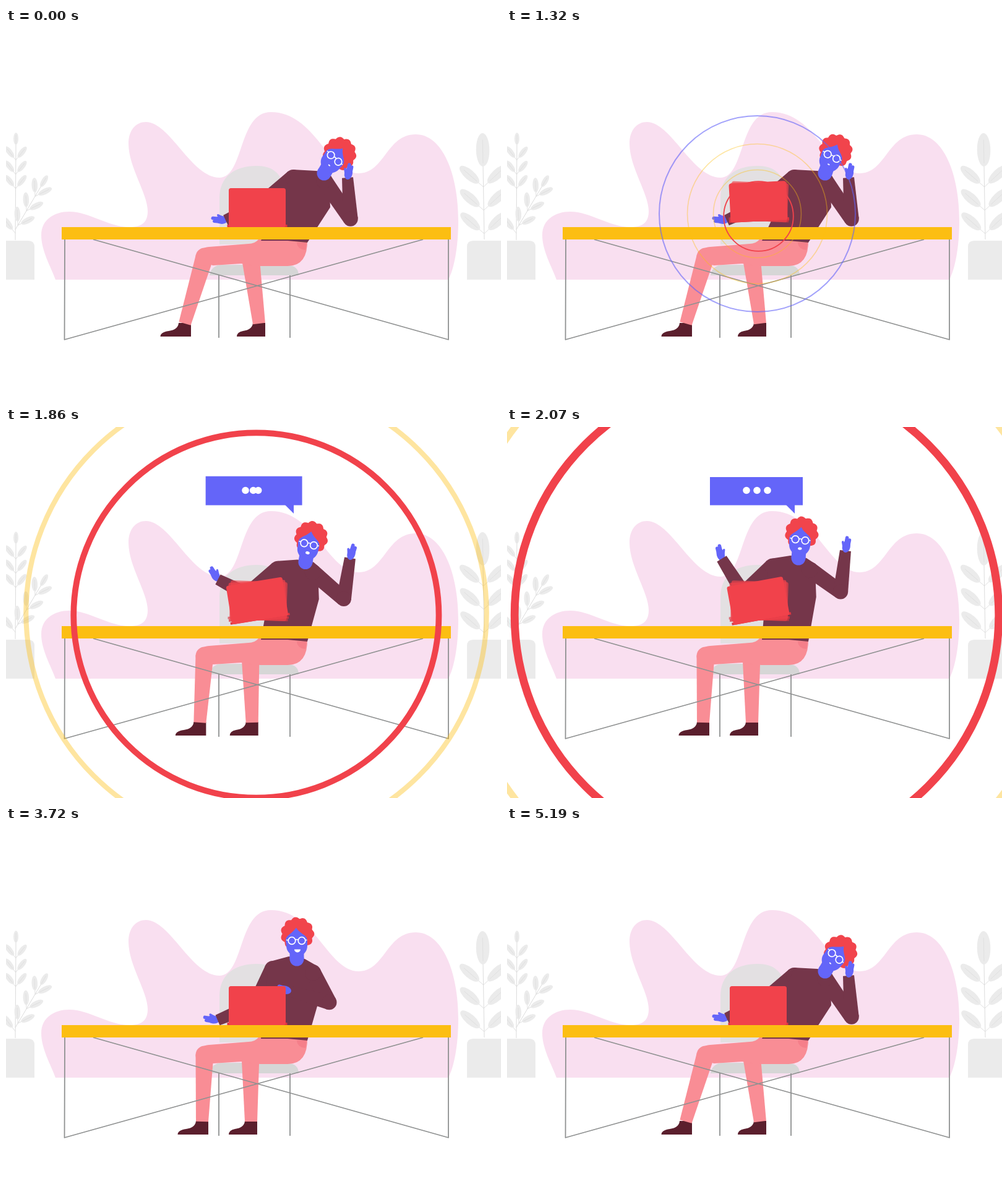
Write an HTML page with a canvas that moves like this. It is 800x600 px and loops after 5400 ms.

```html
<!DOCTYPE html>
<html lang="en">
<head>
<meta charset="utf-8">
<title>Incoming call</title>
<style>
  html, body { margin: 0; width: 100%; height: 100%; overflow: hidden; background: #fff; }
  canvas { display: block; width: 800px; height: 600px; }
</style>
</head>
<body>
<canvas id="stage" width="800" height="600"></canvas>
<script>
const ctx = document.getElementById('stage').getContext('2d');
const LOOP = 5400, STEP = 30, RAD = Math.PI / 180;
const C = {
  blob: '#f9dff0', plant: '#ebebeb', vein: '#dcdcdc', seat: '#d6d6d6', back: '#e3e0e2',
  line: '#8f9191', desk: '#fcbe12', skin: '#6465f9', hair: '#f1444c', knit: '#75364a',
  pants: '#f98d95', pocket: '#f57f8a', shoe: '#5b1f2d', red: '#f1424b', edge: '#dd3540'
};

// ---- motion: smooth monotone curve through [time, value] keys ----
function curve(keys, t) {
  const n = keys.length - 1;
  if (t <= keys[0][0]) return keys[0][1];
  if (t >= keys[n][0]) return keys[n][1];
  const rate = i => (keys[i + 1][1] - keys[i][1]) / (keys[i + 1][0] - keys[i][0]);
  const slope = i => {
    if (i === 0 || i === n) return 0;
    const a = rate(i - 1), b = rate(i);
    return a * b <= 0 ? 0 : 2 * a * b / (a + b);
  };
  let i = 0;
  while (t >= keys[i + 1][0]) i++;
  const h = keys[i + 1][0] - keys[i][0], u = (t - keys[i][0]) / h, v = 1 - u;
  return v * v * (1 + 2 * u) * keys[i][1] + u * u * (3 - 2 * u) * keys[i + 1][1]
       + h * u * v * (v * slope(i) - u * slope(i + 1));
}

// ---- drawing helpers ----
function fill(d, color) { ctx.fillStyle = color; ctx.fill(new Path2D(d)); }
function stroke(d, color, width) {
  ctx.strokeStyle = color; ctx.lineWidth = width; ctx.stroke(new Path2D(d));
}
function disc(x, y, r, color, ry = r) {
  ctx.fillStyle = color; ctx.beginPath(); ctx.ellipse(x, y, r, ry, 0, 0, 7); ctx.fill();
}
function ring(x, y, r, color, width) {
  ctx.strokeStyle = color; ctx.lineWidth = width;
  ctx.beginPath(); ctx.arc(x, y, r, 0, 7); ctx.stroke();
}
function poly(pts, color) {
  ctx.fillStyle = color; ctx.beginPath();
  pts.forEach(p => ctx.lineTo(p[0], p[1]));
  ctx.closePath(); ctx.fill();
}
function bone([x1, y1], w1, [x2, y2], w2, color) {
  const d = Math.hypot(x2 - x1, y2 - y1) || 1, nx = (y1 - y2) / d / 2, ny = (x2 - x1) / d / 2;
  poly([[x1 + nx * w1, y1 + ny * w1], [x2 + nx * w2, y2 + ny * w2],
        [x2 - nx * w2, y2 - ny * w2], [x1 - nx * w1, y1 - ny * w1]], color);
  disc(x1, y1, w1 / 2, color);
}
function at(x, y, deg, draw) {
  ctx.save(); ctx.translate(x, y); ctx.rotate(deg * RAD); draw(); ctx.restore();
}

// ---- scenery ----
const BLOB = 'M80 407C72 385 57 360 57 335C57 310 78 297 102 297C135 297 165 322 200 322' +
  'C222 322 229 312 229 296C229 268 198 225 198 187C198 165 210 152 226 152' +
  'C265 152 300 242 345 242C385 242 375 136 428 136C500 136 520 235 570 235' +
  'C612 235 615 172 662 172C705 172 731 235 731 312C731 355 724 390 715 407Z';

function leaf(x, y, deg, len, gap) {
  at(x, y, deg, () => {
    stroke(`M0 0H${len * (gap + .6)}`, C.vein, .8);
    disc(len * gap, 0, len, C.plant, len * .4);
    stroke(`M${len * (gap - .8)} 0H${len * (gap + .6)}`, C.vein, .7);
  });
}
// A stem with three pairs of leaves between lo and hi, and one leaf on its tip
function frond(x0, y0, x1, y1, lo, hi, len, spread) {
  const dir = Math.atan2(y1 - y0, x1 - x0) / RAD;
  stroke(`M${x0} ${y0}L${x1} ${y1}`, C.vein, 1);
  for (let i = 0; i < 3; i++) {
    const u = lo + (hi - lo) * i / 2, x = x0 + (x1 - x0) * u, y = y0 + (y1 - y0) * u;
    leaf(x, y, dir - spread, len, 1.5);
    leaf(x, y, dir + spread, len, 1.5);
  }
  leaf(x1, y1, dir, len * (spread > 40 ? 1.35 : .9), 1);
}
function scenery() {
  fill(BLOB, C.blob);
  frond(15, 343, 16, 189, .54, .84, 11, 38);
  frond(15, 326, 56, 257, .1, .78, 12, 33);
  leaf(15, 332, -128, 13, 1.6);
  fill('M0 344H36Q46 344 46 354V407H0Z', C.plant);
  frond(773, 342, 771, 224, .08, .72, 20, 48);
  fill('M745 407V354Q745 344 755 344H800V407Z', C.plant);
  fill('M345 350V275C345 240 370 223 405 223C430 223 447 235 447 260V350Z', C.back);
  stroke('M344 399V501M459 399V501', C.line, 1.8);
  fill('M329 400Q332 383 350 383H455Q473 385 473 400Z', C.seat);
}
function desk() {
  ctx.lineJoin = 'round';
  stroke('M95 342L94.5 504L674 342M141 342L715 504V342', C.line, 1.8);
  ctx.fillStyle = C.desk;
  ctx.fillRect(90, 322, 629, 20);
}

// ---- person: each pose is a neck, a head tilt and two wrists ----
const bored = { neck: [514, 235], tilt: 42, left: [355, 311], right: [552, 242] };
const alert = { ...bored, tilt: 27 };
const startled = { neck: [502, 228], tilt: 22, left: [338, 290], right: [565, 229] };
const armsUp = { neck: [471, 212], tilt: 7, left: [347, 213], right: [547, 200] };
const typing = { neck: [454.5, 221], tilt: 0, left: [440, 325], right: [440, 305] };
const done = { neck: [470, 215], tilt: 0, left: [342, 314], right: [458, 267] };
const ACTS = [[900, bored], [1170, alert], [1320, alert], [1650, startled], [2070, armsUp],
  [2280, armsUp], [2700, typing], [3450, typing], [3720, done], [4440, bored]];

const slump = tilt => Math.min(1, tilt / 25);
// Elbow of a two-bone arm, bent towards the pole direction
function elbow([sx, sy], [wx, wy], upper, lower, poleX) {
  const d = Math.hypot(wx - sx, wy - sy), dx = (wx - sx) / d, dy = (wy - sy) / d;
  const along = (upper * upper - lower * lower + d * d) / (2 * d);
  const out = Math.sqrt(Math.max(0, upper * upper - along * along));
  const side = -dy * poleX + dx > 0 ? out : -out;
  return [sx + dx * along - dy * side, sy + dy * along + dx * side];
}
function rig({ neck: [x, y], tilt, left, right }) {
  const k = slump(tilt);
  const ls = [x - 39 - 11 * k, y + 16 - 9 * k], rs = [x + 26 - 26 * k, y + 22 - 11 * k];
  return [[x, y], [tilt, 0], ls, elbow(ls, left, 64, 66, -.5), left,
          rs, elbow(rs, right, 55 + 21 * k, 67, 1), right];
}
const RIGS = ACTS.map(([time, pose]) => [time, rig(pose)]);
const jointsAt = t => RIGS[0][1].map((_, j) =>
  [0, 1].map(axis => curve(RIGS.map(([time, r]) => [time, r[j][axis]]), t)));

function legs(t) {
  const step = curve([[1350, 0], [1650, .42], [1980, 1], [3900, 1], [4470, 0]], t);
  for (const [knee, foot, toe] of [[321, 289 + 28 * step, 39.5], [395, 409 - 13 * step, 36]]) {
    at(foot, 478, 0, () =>
      fill(`M-10 -1H10V21H${-toe}Q${-toe} 14 -26 12Q-11 10 -10 -1Z`, C.shoe));
    bone([knee, 370], 29, [foot, 478], 20, C.pants);
  }
  fill('M408 342H487Q488 385 455 385H411L380 381L334 384L308 371Q312 355 328 354L392 349Q402 349 408 342Z', C.pants);
  fill('M470 347Q471 358 484 359L486 347Z', C.pocket);
}
function hand([x, y], deg, side, tap) {
  at(x, y, deg, () => {
    ctx.scale(1, side);
    disc(7, 0, 10, C.skin, 6.5);
    ctx.lineCap = 'round';
    stroke('M5 -4L13 -7', C.skin, 3.5);
    at(10, 0, tap, () => stroke('M0 -1.5L11 -1.5M0 3L8 3', C.skin, 5.5));
    ctx.lineCap = 'butt';
  });
}
function arm(shoulder, bend, wrist) {
  bone(shoulder, 26, bend, 24, C.knit);
  bone(bend, 24, wrist, 18, C.knit);
}
function head([nx, ny], tilt, t) {
  const lean = tilt * .84 * RAD;
  const x = nx + 29.5 * Math.sin(lean), y = ny - 29.5 * Math.cos(lean);
  const smile = curve([[2300, 0], [2600, 1], [3900, 1], [4300, 0]], t);
  const gasp = curve([[1320, 0], [1650, 1], [2300, .6], [2500, 0]], t);
  at(x, y, tilt, () => {
    const curls = [];
    for (let d = 0; d < 360; d += 3) {
      const r = 24.3 + 3 * Math.abs(Math.cos(5.5 * d * RAD));
      curls.push([1 + r * Math.cos(d * RAD), -11 + r * Math.sin(d * RAD)]);
    }
    poly(curls, C.hair);
  });
  bone([nx, ny], 23, [x - 12 * Math.sin(tilt * RAD), y + 12 * Math.cos(tilt * RAD)], 23, C.skin);
  at(x, y, tilt, () => {
    fill('M-18 0C-18 -9 -10 -9 -1 -21C6 -10 17 -10 17 0V8C17 18 10 25 1 25C-9 25 -17 18 -17 8Z', C.skin);
    ring(-8, 0, 5.8, '#fff', 1.7);
    ring(8, 0, 5.8, '#fff', 1.7);
    stroke('M-2.5 -1Q0 -3 2.5 -1M-14 -1H-17M14 -1H16.5', '#fff', 1.5);
    const w = 2 + 3 * smile + 1.5 * gasp, rest = (1 + 1.4 * gasp) * (1 - smile);
    ctx.fillStyle = '#fff';
    ctx.beginPath();
    ctx.ellipse(1, 14, w, rest, 0, Math.PI, 2 * Math.PI);
    ctx.ellipse(1, 14, w, rest + 5 * smile, 0, 0, Math.PI);
    ctx.fill();
  });
}
function person(t) {
  const [neck, [tilt], ls, le, lw, rs, re, rw] = jointsAt(t);
  const [nx, ny] = neck;
  const idle = t < 900 || t > 4500;
  const tap = idle ? 24 * Math.abs(Math.sin(Math.PI * Math.min(t, 5190) * 17 / 5190)) : 0;
  const leftDir = Math.atan2(lw[1] - le[1], lw[0] - le[0]);
  const rightDir = Math.atan2(rw[1] - re[1], rw[0] - re[0]);
  legs(t);
  hand(lw, leftDir / RAD - 34 * Math.cos(leftDir), -1, -tap);
  arm(ls, le, lw);
  poly([[412, 344], [ls[0] - 8, ls[1] + 8], [ls[0], ls[1] - 13], [nx - 13, ny - 4], [nx + 13, ny],
        [rs[0] + 8, rs[1] - 10], [rs[0] + 10, rs[1] + 44], [487, 347], [455, 344]], C.knit);
  arm(rs, re, rw);
  head(neck, tilt, t);
  hand(rw, rightDir / RAD + 16 * slump(tilt), 1, 0);
}

// ---- ringing ----
function rings(t) {
  const s = curve([[1020, 0], [1140, .34], [1320, 1], [1650, 3.57], [2070, 6.95], [2430, 10]], t);
  if (s <= 0 || s >= 10) return;
  const yellow = 'rgba(252,190,18,.4)';
  ring(404.5, 300.5, 158.5 * s, 'rgba(100,101,249,.6)', 2 * s);
  ring(404.5, 300.5, 113 * s, yellow, 1.55 * s);
  ring(404.5, 300.5, 71 * s, yellow, 1.55 * s);
  ring(407 - .5 * s, 304.5, 56.3 * s, C.red, 1.85 * s);
}
function laptop(t) {
  const amp = curve([[1020, 0], [1200, 1], [2300, 1], [2600, 0]], t);
  const tilt = curve([[1020, 0], [1320, -3], [1650, -7], [2070, -9.5], [2600, 0]], t);
  const jitter = amp * Math.sin(2 * Math.PI * (t - 1320) / 110);
  const shell = (dx, deg, alpha) => at(406 + dx, 291 - 9.5 * amp, deg, () => {
    ctx.globalAlpha = alpha;
    ctx.fillStyle = C.edge;
    ctx.fillRect(-48.5, 27, 97, 4);
    ctx.fillStyle = C.red;
    ctx.beginPath(); ctx.roundRect(-46, -32, 92, 63, 3.5); ctx.fill();
    ctx.globalAlpha = 1;
  });
  if (amp > 0) {
    shell(2 * amp, 2.5 * amp + jitter, .65);
    shell(amp, tilt * .4 - jitter, .75);
  }
  shell(0, tilt + jitter, 1);
}
function bubble(t) {
  const p = curve([[1590, 0], [1650, .1], [1860, 1.04], [1980, 1], [3420, 1], [3600, 0]], t);
  if (p <= .01) return;
  const left = 462 - 134 * p, right = 463.5 + 14.5 * p, top = 114.3 - 33.3 * p;
  ctx.fillStyle = C.skin;
  ctx.fillRect(left, top, right - left, 126.5 - top);
  const tail = 14 * Math.min(1, Math.max(0, (p - .2) / .8));
  poly([[465 - tail, 126], [465, 126], [465, 126 + tail]], C.skin);
  for (let i = 0; i < 3; i++) {
    const start = 1650 + 60 * i;
    if (t < start) continue;
    const slide = curve([[start, -22], [start + 210, 0]], t);
    const u = (t - 2100 - 60 * i) % 450;
    const hop = u > 0 && u < 200 ? 4 * Math.sin(Math.PI * u / 200) : 0;
    disc(387 + 17 * i + slide, 102.5 - hop, 5.8 * (t > 3420 ? p : 1), '#fff');
  }
}

function draw(t) {
  ctx.fillStyle = '#fff';
  ctx.fillRect(0, 0, 800, 600);
  scenery();
  person(t);
  desk();
  rings(t);
  laptop(t);
  bubble(t);
}

const begin = performance.now();
function tick() {
  const t = (performance.now() - begin) % LOOP;
  draw(Math.floor(t / STEP) * STEP);
  requestAnimationFrame(tick);
}
tick();
</script>
</body>
</html>
```
